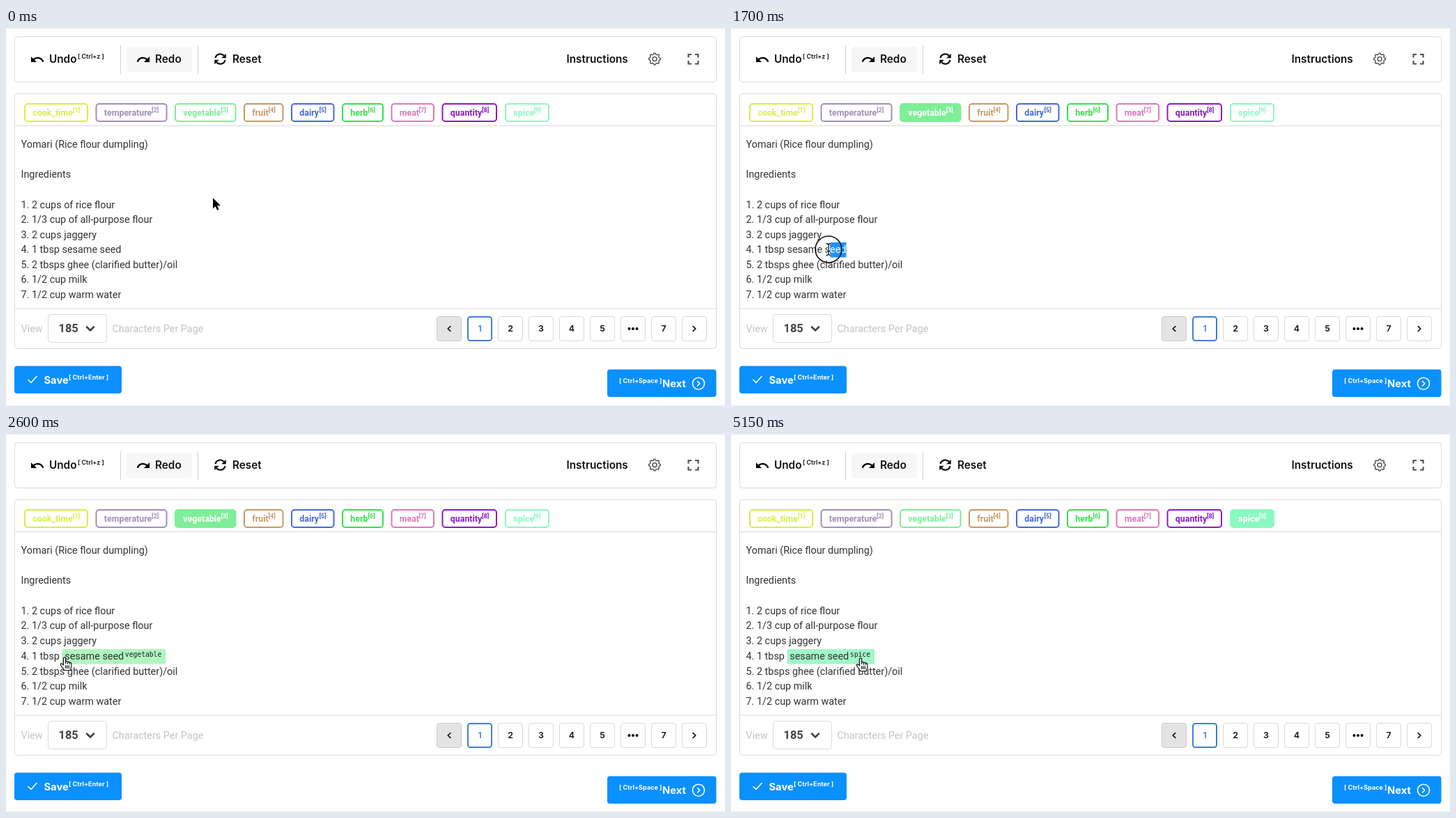
Animation, 1032 px wide and 543 px high, one loop 5430 ms. Source, as an HTML page:

```html
<!DOCTYPE html>
<html lang="en">
<head>
<meta charset="utf-8">
<title>Text labelling</title>
<style>
html, body { margin: 0; width: 100%; height: 100%; overflow: hidden; background: #fff; }
svg { display: block; }
text { white-space: pre; font-family: Roboto, sans-serif; font-size: 14.4px; fill: #333; }
.ui { font-family: Inter, sans-serif; font-weight: 600; font-size: 15.3px; fill: #111; }
.key { font-size: 8.9px; }
.btn { font-weight: 700; font-size: 14.7px; fill: #fff; }
.btn.key { font-size: 9.1px; }
.num { font-size: 12.4px; text-anchor: middle; }
.mute { fill: #c4c4c4; }
.tag { font-weight: 700; font-size: 12.4px; }
.mono { font-family: "DejaVu Sans Mono", monospace; font-size: 9.7px; fill: #222; }
.box { fill: #fff; stroke: #d9d9d9; }
.line { fill: none; stroke-linecap: round; stroke-linejoin: round; }
</style>
</head>
<body>
<svg id="stage" width="1032" height="543" viewBox="0 0 1032 543">
  <path d="M0 .5H1032M0 542.5H1032" stroke="#f1f1f1"/>
  <rect class="box" x="12.5" y="12.5" width="1007" height="65" rx="4"/>
  <rect class="box" id="panel" x="12.5" y="94.5" width="1007" height="366" rx="4"/>
  <path d="M13 140.5H1019" stroke="#d9d9d9"/>
  <path d="M164.5 25V66M275.5 25V66" stroke="#d0d0d0"/>
  <rect x="173" y="27" width="94" height="36" rx="4" fill="#f7f7f7"/>
  <defs>
    <path id="turn" d="M12.5 8c-2.65 0-5.05.99-6.9 2.6L2 7v9h9l-3.62-3.62c1.39-1.16 3.16-1.88 5.12-1.88 3.54 0 6.55 2.31 7.6 5.5l2.37-.78C21.08 11.03 17.15 8 12.5 8z"/>
    <g id="half">
      <path d="M-7 -1.5A7.1 7.1 0 0 1 5.3 -4.7" fill="none" stroke="#111" stroke-width="2.3"/>
      <path d="M8.3 -7.8V-1.2H1.7Z" fill="#111"/>
    </g>
  </defs>
  <use href="#turn" transform="translate(34.2 34.6) scale(.9)"/>
  <use href="#turn" transform="translate(207.8 34.6) scale(-.9 .9)"/>
  <g transform="translate(307.5 44.5)"><use href="#half"/><use href="#half" transform="rotate(180)"/></g>
  <text class="ui" x="62" y="50">Undo</text>
  <text class="ui key" x="103" y="43.5">[ Ctrl+z ]</text>
  <text class="ui" x="214" y="50">Redo</text>
  <text class="ui" x="325" y="50">Reset</text>
  <text class="ui" x="804.5" y="50">Instructions</text>
  <g transform="translate(931 44.5)" class="line" stroke="#555" stroke-width="1.5">
    <path id="gear"/><circle r="3"/>
  </g>
  <path d="M984 38H979.5V42.5M989 38H993.5V42.5M979.5 47V51.5H984M993.5 47V51.5H989" fill="none" stroke="#555" stroke-width="2.2"/>
  <g id="tags"></g>
  <g id="recipe"></g>
  <g id="low">
    <path d="M13 403H1019" stroke="#d9d9d9"/>
    <text class="mute" x="21.5" y="436.7">View</text>
    <rect class="box" x="60.5" y="411.5" width="84" height="40" rx="4"/>
    <text x="75.5" y="437.4" style="font-weight:700;font-size:16.4px;fill:#444">185</text>
    <path class="line" d="M116 429.5l5 5 5-5" stroke="#444" stroke-width="2.6"/>
    <text class="mute" x="152.5" y="436.7">Characters Per Page</text>
    <g id="pages"></g>
    <rect x="12" y="485.5" width="154" height="39.5" rx="4" fill="#0a90ff"/>
    <path class="line" d="M32 505.5l4 4 8-9" stroke="#fff" stroke-width="1.6"/>
    <text class="ui btn" x="54.5" y="510.5">Save</text>
    <text class="ui btn key" x="90" y="504.5">[ Ctrl+Enter ]</text>
    <rect x="863" y="490.5" width="156.5" height="39.5" rx="4" fill="#0a90ff"/>
    <text class="ui btn key" x="880" y="509.5">[ Ctrl+Space ]</text>
    <text class="ui btn" x="942" y="515.7">Next</text>
    <g class="line" stroke="#fff" stroke-width="1.6"><circle cx="994" cy="510.7" r="8.5"/><path d="M992.6 507.5l3.2 3.2-3.2 3.2"/></g>
  </g>
  <g id="row">
    <rect id="mark" y="308" height="21.5"/>
    <text id="plain" x="21.5" y="323.1"></text>
    <text id="picked" y="323.1"></text>
    <text id="note" class="mono" x="170.8" y="319"></text>
  </g>
  <g id="pointer" stroke-linejoin="round">
    <circle id="ring" r="19" fill="none" stroke="#111" stroke-width="1.6"/>
    <path id="arrow" d="M0 0V15.5L3.6 12.2 6.1 17.8 8.6 16.7 6.2 11.2H11Z" stroke="#fff" stroke-width="1.2" paint-order="stroke"/>
    <g id="hand" stroke="#111" stroke-width="1.2" stroke-linecap="round">
      <path fill="#fff" d="M-1.6 1.2C-1.6-.6 1.6-.6 1.6 1.2V6.5C2 5 4.2 5.2 4.4 6.8 5 5.6 7 6 7.2 7.6 8 6.8 9.8 7.2 9.8 9V12.5C9.8 15 8.4 16 8.4 18.5H-.6C-.8 16.5-3.5 14.5-5.6 10.8-6.5 9-4.2 7.6-1.6 10.8Z"/>
      <path d="M1.7 11.5v4M4 11.5v4M6.3 11.5v4M1.6 6.5V8.5M4.4 7V9M7.2 7.6V9.4"/>
    </g>
    <g id="beam" fill="none">
      <path id="bar" d="M-3.5-8.5Q0-8.5 0-6 0-8.5 3.5-8.5M0-6V6M-3.5 8.5Q0 8.5 0 6 0 8.5 3.5 8.5M-2 2.5H2" stroke="#fff" stroke-width="3"/>
      <use href="#bar" id="core"/>
      <path d="M-3.5-8.5Q0-8.5 0-6 0-8.5 3.5-8.5M0-6V6M-3.5 8.5Q0 8.5 0 6 0 8.5 3.5 8.5M-2 2.5H2" stroke="#111" stroke-width="1.3"/>
    </g>
  </g>
</svg>
<script>
const LOOP = 5430, STEP = 50;
const $ = id => document.getElementById(id);

function add(parent, tag, attrs, text) {
  const el = document.createElementNS('http://www.w3.org/2000/svg', tag);
  for (const k in attrs) el.setAttribute(k, attrs[k]);
  if (text) el.textContent = text;
  parent.append(el);
  return el;
}
const show = (id, on) => { $(id).style.display = on ? '' : 'none'; };

$('core').remove();

// Gear outline with eight soft teeth
let gear = '';
for (let i = 0; i < 32; i++) {
  const a = (i - .5) * Math.PI / 16, r = i % 4 < 2 ? 8.4 : 6.7;
  gear += (i ? 'L' : 'M') + (r * Math.sin(a)).toFixed(2) + ' ' + (-r * Math.cos(a)).toFixed(2);
}
$('gear').setAttribute('d', gear + 'Z');

// name, left, right, colour, x of the shortcut
const tags = [
  ['cook_time', 26, 118, '#d6f044', 96], ['temperature', 128.5, 231.5, '#a190b8', 209],
  ['vegetable', 242, 330.5, '#7eee98', 308.5], ['fruit', 341, 398.5, '#c59a65', 376.5],
  ['dairy', 409, 471.5, '#4568dc', 449.5], ['herb', 482, 542, '#35e04c', 519.5],
  ['meat', 552.5, 615, '#dc78b8', 592.5], ['quantity', 625.5, 705, '#8c1bc0', 683],
  ['spice', 716, 780, '#8af9c1', 757.5]
].map(([name, x, end, color, keyX], i) => {
  const g = $('tags');
  const box = add(g, 'rect', { x: x + 1, y: 109, width: end - x - 2, height: 25, rx: 4, stroke: color, 'stroke-width': 2 });
  const label = add(g, 'text', { class: 'tag', x: x + 12.3, y: 125.5 }, name);
  const key = add(g, 'text', { class: 'tag', x: keyX, y: 121.3 }, `[${i + 1}]`);
  key.style.fontSize = '9.2px';
  return { name, paint(on) {
    box.setAttribute('fill', on ? color : '#fff');
    label.style.fill = key.style.fill = on ? '#fff' : color;
  } };
});

const ROW = '4. 1 tbsp sesame seed', WORD = 10;
const lines = ['Yomari (Rice flour dumpling)', '', 'Ingredients', '', '1. 2 cups of rice flour',
  '2. 1/3 cup of all-purpose flour', '3. 2 cups jaggery', '', '5. 2 tbsps ghee (clarified butter)/oil',
  '6. 1/2 cup milk', '7. 1/2 cup warm water'];
lines.forEach((s, i) => {
  if (s) add($(i > 7 ? 'low' : 'recipe'), 'text', { x: 21.5, y: 172.4 + 21.53 * i }, s);
});

['<', 1, 2, 3, 4, 5, '…', 7, '>'].forEach((s, i) => {
  const g = $('pages'), x = 618 + 44 * i, mid = x + 18, on = i === 1;
  const box = add(g, 'rect', { class: 'box', x: x + (on ? 1 : .5), y: on ? 415 : 414.5, width: on ? 34 : 35, height: on ? 34 : 35, rx: 3.5 });
  if (i === 0) box.style.cssText = 'fill:#e4e4e4;stroke:#cccccc';
  if (on) box.style.cssText = 'stroke:#3f7fd8;stroke-width:2';
  if (s === '…') {
    for (const d of [-5.5, 0, 5.5]) add(g, 'circle', { cx: mid + d, cy: 432, r: 2 });
  } else if (s === '<' || s === '>') {
    const d = s === '<' ? -1.8 : 1.8;
    add(g, 'path', { class: 'line', d: `M${mid - d} 428.6L${mid + d} 432L${mid - d} 435.4`, stroke: '#111', 'stroke-width': 1.7 });
  } else {
    const t = add(g, 'text', { class: 'ui num', x: mid, y: 436.4 }, String(s));
    if (on) t.style.fill = '#3f7fd8';
  }
});

// Left edge of every character in the row
$('plain').textContent = ROW;
const edges = [...ROW].map((c, i) => $('plain').getStartPositionOfChar(i).x);
const rowEnd = $('plain').getEndPositionOfChar(ROW.length - 1).x;

// time, x, y, eased towards the next, sag of the path
const path = [
  [0, 297, 244, 1], [550, 307, 124], [800, 307, 124, 1], [1300, 165, 318], [1350, 165, 318],
  [1700, 140, 318], [2250, 84.5, 320], [2350, 81, 320], [2450, 81, 320], [2500, 84, 321],
  [3950, 84, 321, 1, 8], [4500, 181, 322], [4550, 181, 322, 1], [4800, 171, 322],
  [4900, 171, 322, 1], [5150, 186, 322], [LOOP, 186, 322]
];
function place(t) {
  const i = path.findIndex((k, n) => t < path[n + 1][0]);
  const [t0, x0, y0, eased, sag = 0] = path[i], [t1, x1, y1] = path[i + 1];
  let p = (t - t0) / (t1 - t0);
  if (eased) p = p * p * (3 - 2 * p);
  return [x0 + (x1 - x0) * p, y0 + (y1 - y0) * p + sag * Math.sin(Math.PI * p)];
}

function drawRow(t, x) {
  const labelled = t >= 2450, mark = $('mark'), picked = $('picked');
  let from = ROW.length;
  if (labelled) {
    from = WORD;
  } else if (t >= 1350) {
    const near = [...edges, rowEnd].map(e => Math.abs(e - x));
    from = near.indexOf(Math.min(...near));
  }
  const left = from < ROW.length ? edges[from] : rowEnd;
  const name = t < 3450 ? 'vegetable' : 'spice';
  const color = name === 'spice' ? '#a1f7c9' : t < 3000 ? '#b0f5c0' : '#9af2ae';
  $('plain').textContent = ROW.slice(0, from);
  picked.textContent = ROW.slice(from);
  picked.setAttribute('x', left + (labelled ? 3.8 : 0));
  picked.style.fill = labelled ? '#333' : '#fff';
  $('note').textContent = labelled ? name : '';
  mark.setAttribute('x', left);
  mark.setAttribute('width', labelled ? 96.5 + 5.84 * name.length : rowEnd - left);
  mark.setAttribute('rx', labelled ? 2.5 : 0);
  mark.setAttribute('fill', labelled ? color : '#1e90ff');
  $('row').setAttribute('transform', `translate(0 ${+labelled})`);
  $('low').setAttribute('transform', `translate(0 ${+labelled})`);
  $('panel').setAttribute('height', 366 + labelled);
}

function draw(time) {
  const t = Math.floor(time % LOOP / STEP) * STEP;
  const [x, y] = place(t);
  const active = t < 500 ? '' : t < 3450 ? 'vegetable' : 'spice';
  for (const tag of tags) tag.paint(tag.name === active);
  drawRow(t, x);
  const beam = t >= 1300 && t < 2500, hand = t >= 2500 || y < 135;
  show('beam', beam);
  show('hand', hand);
  show('arrow', !beam && !hand);
  show('ring', t >= 1350 && t < 2450);
  $('pointer').setAttribute('transform', `translate(${x} ${y})`);
}

const start = performance.now();
function tick() {
  draw(performance.now() - start);
  requestAnimationFrame(tick);
}
tick();
</script>
</body>
</html>
```
